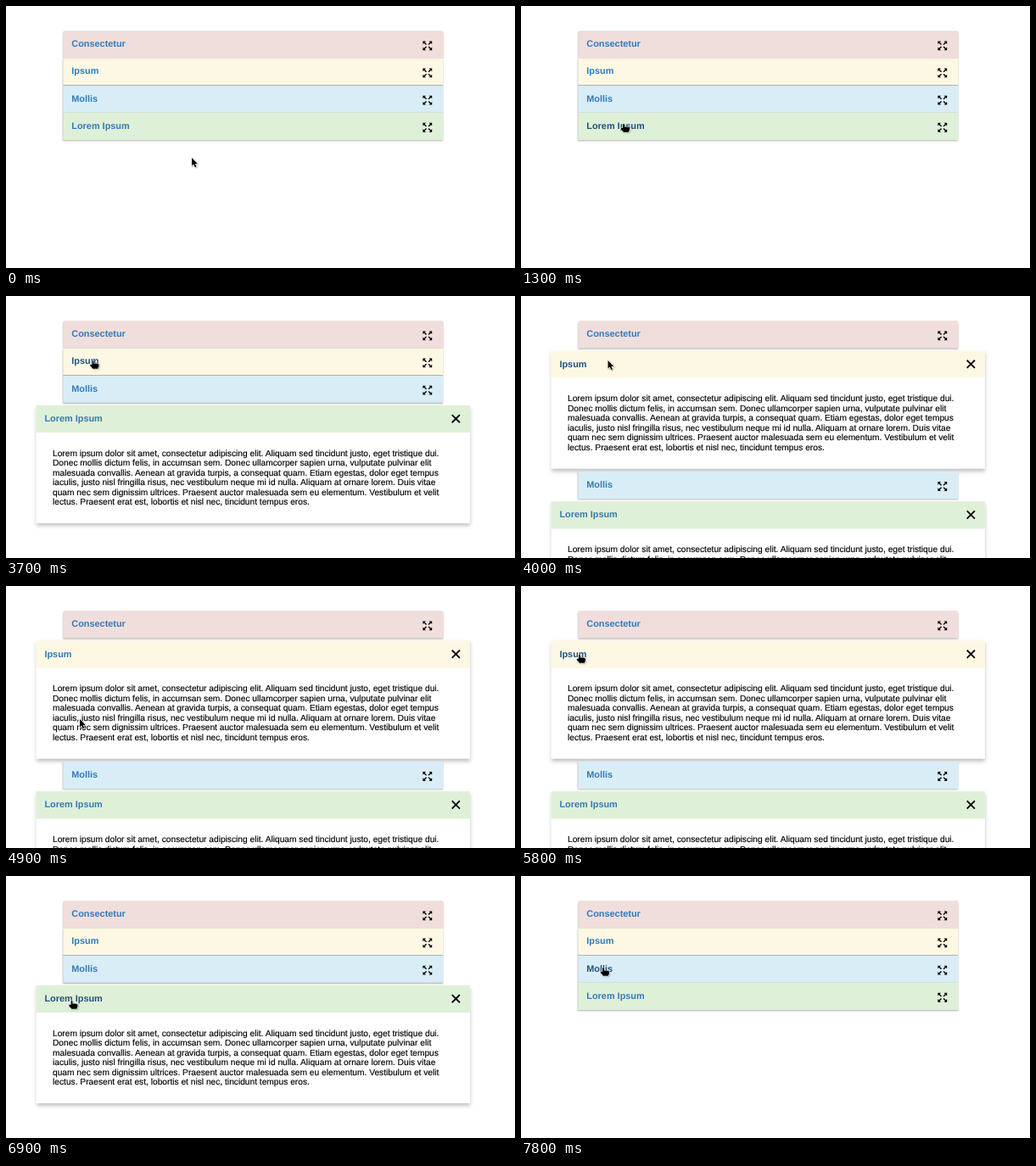
An HTML page with a canvas that plays this animation: 600 by 309 pixels, repeating every 8000 ms.

```html
<!DOCTYPE html>
<html lang="en">
<head>
<meta charset="utf-8">
<title>Accordion</title>
<style>
  html, body { margin: 0; width: 100%; height: 100%; overflow: hidden; background: #fff; }
  canvas { display: block; }
</style>
</head>
<body>
<canvas id="stage" width="600" height="309"></canvas>
<script>
const ctx = document.getElementById('stage').getContext('2d');
const LOOP = 8000, STEP = 100;
const TOP = 29.3, ROW = 32.15, GAP = 3.2, BODY = 107, LEADING = 11.5;
const FACE = '"Liberation Sans", Arial, sans-serif';
const TITLE_FONT = 'bold 10.9px ' + FACE, BODY_FONT = '10.21px ' + FACE;

// A panel with clicks opens at the first and closes at the second.
const panels = [
  { title: 'Consectetur', color: '#f0dedd', clicks: [] },
  { title: 'Ipsum', color: '#fcf8e3', clicks: [4000, 6000] },
  { title: 'Mollis', color: '#d9edf7', clicks: [] },
  { title: 'Lorem Ipsum', color: '#dff0d8', clicks: [1500, 7100] }
];

const lines = [
  'Lorem ipsum dolor sit amet, consectetur adipiscing elit. Aliquam sed tincidunt justo, eget tristique dui.',
  'Donec mollis dictum felis, in accumsan sem. Donec ullamcorper sapien urna, vulputate pulvinar elit',
  'malesuada convallis. Aenean at gravida turpis, a consequat quam. Etiam egestas, dolor eget tempus',
  'iaculis, justo nisl fringilla risus, nec vestibulum neque mi id nulla. Aliquam at ornare lorem. Duis vitae',
  'quam nec sem dignissim ultrices. Praesent auctor malesuada sem eu elementum. Vestibulum et velit',
  'lectus. Praesent erat est, lobortis et nisl nec, tincidunt tempus eros.'
];

// Places where the pointer comes to rest.
const stops = [
  { arrive: 0, leave: 0, x: 219, y: 179 },
  { arrive: 700, leave: 1200, x: 133, y: 143 },
  { arrive: 1300, leave: 1800, x: 121, y: 139 },
  { arrive: 2200, leave: 2200, x: 181.5, y: 277 },
  { arrive: 2400, leave: 2400, x: 204, y: 292 },
  { arrive: 3600, leave: 4000, x: 102.5, y: 76 },
  { arrive: 4800, leave: 4900, x: 87, y: 157 },
  { arrive: 5700, leave: 6000, x: 69, y: 81 },
  { arrive: 6700, leave: 7100, x: 77.5, y: 147 },
  { arrive: 7700, leave: LOOP, x: 97, y: 108 }
];

const arrow = new Path2D('M0 0V9.6L2.2 7.6L3.8 11.2L5.4 10.5L3.9 7H6.8Z');
const hand = new Path2D('M-.9 .6Q0-.5 .9 .6V3.6H4.5L7 4.4V7L5.8 9.8H-.2L-3.2 6.2V4.8H-.9Z');

function pointerAt(t) {
  const i = stops.findLastIndex(s => s.arrive <= t);
  const a = stops[i], b = stops[i + 1] || a;
  if (t <= a.leave) return a;
  const k = (t - a.leave) / (b.arrive - a.leave);
  const e = k * k * (3 - 2 * k);
  return { x: a.x + (b.x - a.x) * e, y: a.y + (b.y - a.y) * e };
}

function layoutAt(t) {
  let y = TOP;
  return panels.map(panel => {
    const [opens, closes] = panel.clicks;
    const open = t >= opens && t < closes;
    if (open) y += GAP;
    const x = open ? 35.5 : 67.4;
    const item = { ...panel, open, x, y, w: 582.4 - 2 * x + (open ? 0 : 0.2), textX: x + 9.9, base: y + 19 };
    y += open ? ROW + BODY + GAP : ROW;
    return item;
  });
}

function isOver(p, item) {
  ctx.font = TITLE_FONT;
  const dx = p.x - item.textX, dy = p.y - item.base;
  return dx >= 0 && dx <= ctx.measureText(item.title).width && dy > -10 && dy < 3;
}

function box(x, y, w, h, color, radius = 0) {
  ctx.fillStyle = color;
  ctx.beginPath();
  ctx.roundRect(x, y, w, h, radius);
  ctx.fill();
}

function card(x, y, w, h, color, radius, dy, blur, alpha) {
  ctx.save();
  ctx.shadowColor = `rgba(0,0,0,${alpha})`;
  ctx.shadowOffsetY = dy;
  ctx.shadowBlur = blur;
  box(x, y, w, h, color, radius);
  ctx.restore();
}

function expandIcon(x, y) {
  ctx.strokeStyle = ctx.fillStyle = '#000';
  ctx.lineWidth = 1.4;
  for (const sx of [-1, 1]) for (const sy of [-1, 1]) {
    ctx.save();
    ctx.translate(x, y);
    ctx.scale(sx, sy);
    ctx.beginPath();
    ctx.moveTo(1.3, 1.3);
    ctx.lineTo(4.5, 4.5);
    ctx.stroke();
    ctx.beginPath();
    ctx.moveTo(5.4, 5.4);
    ctx.lineTo(5.4, 1.8);
    ctx.lineTo(1.8, 5.4);
    ctx.fill();
    ctx.restore();
  }
}

function closeIcon(x, y) {
  ctx.strokeStyle = '#000';
  ctx.lineWidth = 1.8;
  ctx.beginPath();
  for (const s of [-1, 1]) {
    ctx.moveTo(x - 4.6, y - 4.6 * s);
    ctx.lineTo(x + 4.6, y + 4.6 * s);
  }
  ctx.stroke();
}

function drawBody(y) {
  ctx.font = BODY_FONT;
  ctx.fillStyle = ctx.strokeStyle = '#000';
  ctx.lineWidth = 0.15;
  lines.forEach((line, i) => {
    ctx.fillText(line, 55, y + i * LEADING);
    ctx.strokeText(line, 55, y + i * LEADING);
  });
}

function drawPanel(item, i, dark) {
  const { x, y, w, color } = item;
  if (item.open) {
    card(x, y, w, ROW + BODY, '#fff', 0, 2.8, 4.5, 0.24);
    box(x, y, w, ROW, color);
    drawBody(y + 59.7);
    closeIcon(530.3, y + 15.7);
  } else {
    card(x, y, w, ROW, color, i ? 0 : [1.5, 1.5, 0, 0], 1.1, 1.8, 0.32);
    expandIcon(496.8, y + 17.5);
  }
  ctx.font = TITLE_FONT;
  ctx.fillStyle = dark ? '#23527c' : '#337ab7';
  ctx.fillText(item.title, item.textX, item.base);
}

function drawPointer(p, shape) {
  ctx.save();
  ctx.translate(p.x, p.y);
  ctx.lineJoin = 'round';
  ctx.shadowColor = 'rgba(0,0,0,.35)';
  ctx.shadowOffsetX = ctx.shadowOffsetY = 0.7;
  ctx.shadowBlur = 1.5;
  ctx.strokeStyle = '#fff';
  ctx.lineWidth = 1.1;
  ctx.stroke(shape);
  ctx.shadowColor = 'transparent';
  ctx.fillStyle = '#000';
  ctx.fill(shape);
  ctx.restore();
}

function draw(t) {
  ctx.textRendering = 'geometricPrecision';
  ctx.fillStyle = '#fff';
  ctx.fillRect(0, 0, 600, 309);
  const p = pointerAt(t);
  const items = layoutAt(t);
  items.forEach((item, i) => {
    // A title stays dark for a moment after its click.
    const clicked = item.clicks.some(c => t >= c && t < c + 300);
    drawPanel(item, i, clicked || isOver(p, item));
  });
  if (!items[1].open) box(67.4, 93, 447.6, 1, 'rgba(0,0,0,.2)');
  drawPointer(p, items.some(item => isOver(p, item)) ? hand : arrow);
}

function tick(now) {
  draw(Math.floor((now % LOOP) / STEP) * STEP);
  requestAnimationFrame(tick);
}
requestAnimationFrame(tick);
</script>
</body>
</html>
```
